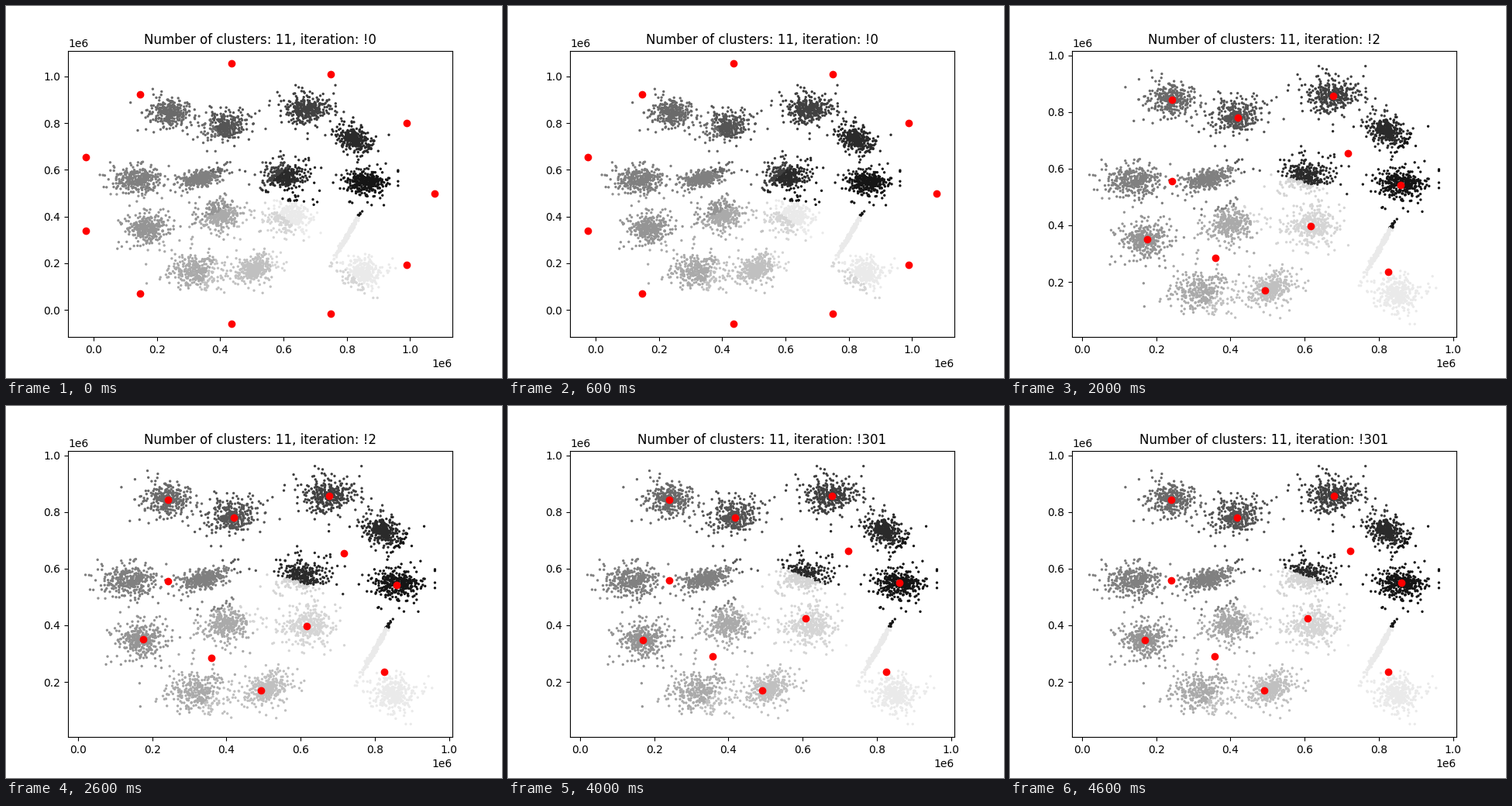
Animation, 640 px wide and 480 px high, one loop 5 s. Source, as a matplotlib script:

```python
import matplotlib.pyplot as plt
import numpy as np
from matplotlib.animation import FuncAnimation

K = 11
PER_BLOB = 333
ITERATIONS = [0, 1, 2, 3, 301]
SETTLED = 3  # centers stay put after this many updates

LOW = np.array([19.8e3, 51.1e3])
HIGH = np.array([962e3, 970.8e3])

# mean x, mean y (thousands), then spread and tilt where a blob is not round
BLOBS = [
    (241, 844), (416, 786, 34, 31, 0.3), (674, 860), (823, 732, 30, 32, -0.3),
    (139, 557, 42, 30), (339, 564, 38, 22, 0.55), (604, 574), (861, 546),
    (169, 349), (399, 404), (619, 398), (802, 318, 18, 42, 0.985),
    (322, 165, 42, 39), (509, 175, 36, 33, 0.4), (851, 158, 32, 33),
]


def make_blob(rng, mx, my, sx=37, sy=34, corr=0.0):
    """Correlated cloud with a dense core and sparse fringe."""
    u, v = rng.normal(size=(2, PER_BLOB)) * rng.uniform(0.5, 1.35, PER_BLOB)
    u, v = u - u.mean(), v - v.mean()
    x = mx + sx * u
    y = my + sy * (corr * u + np.sqrt(1 - corr**2) * v)
    return np.column_stack([x, y]) * 1e3


def ring(cx, cy, radius):
    angle = 2 * np.pi * np.arange(K) / K
    return np.column_stack([cx + radius * np.cos(angle),
                            cy + radius * np.sin(angle)])


def nearest(centers):
    gaps = points[:, None] - centers[None]
    return (gaps**2).sum(axis=2).argmin(axis=1)


def update(centers):
    labels = nearest(centers)
    return np.array([points[labels == k].mean(axis=0) for k in range(K)])


rng = np.random.default_rng(7)
points = np.vstack([make_blob(rng, *blob) for blob in BLOBS])
points = np.clip(points, LOW, HIGH)

history = [ring(515e3, 496.7e3, 563.5e3)]
for _ in range(SETTLED):
    history.append(update(history[-1]))

fig, ax = plt.subplots(figsize=(6.4, 4.8), dpi=100)


def draw(i):
    step = ITERATIONS[i]
    centers = history[min(step, SETTLED)]
    shade = (nearest(centers) + 1) / (K + 1)
    low = np.minimum(LOW, centers.min(axis=0))
    high = np.maximum(HIGH, centers.max(axis=0))
    pad = 0.05 * (high - low)

    ax.clear()
    ax.scatter(*points.T, s=2, c=shade, cmap="gray", vmin=0, vmax=1)
    ax.scatter(*centers.T, c="red")
    ax.set_xlim(low[0] - pad[0], high[0] + pad[0])
    ax.set_ylim(low[1] - pad[1], high[1] + pad[1])
    ax.set_title(f"Number of clusters: {K}, iteration: !{step}")


anim = FuncAnimation(fig, draw, frames=len(ITERATIONS), interval=1000,
                     repeat=True, repeat_delay=0)
plt.show()
```
